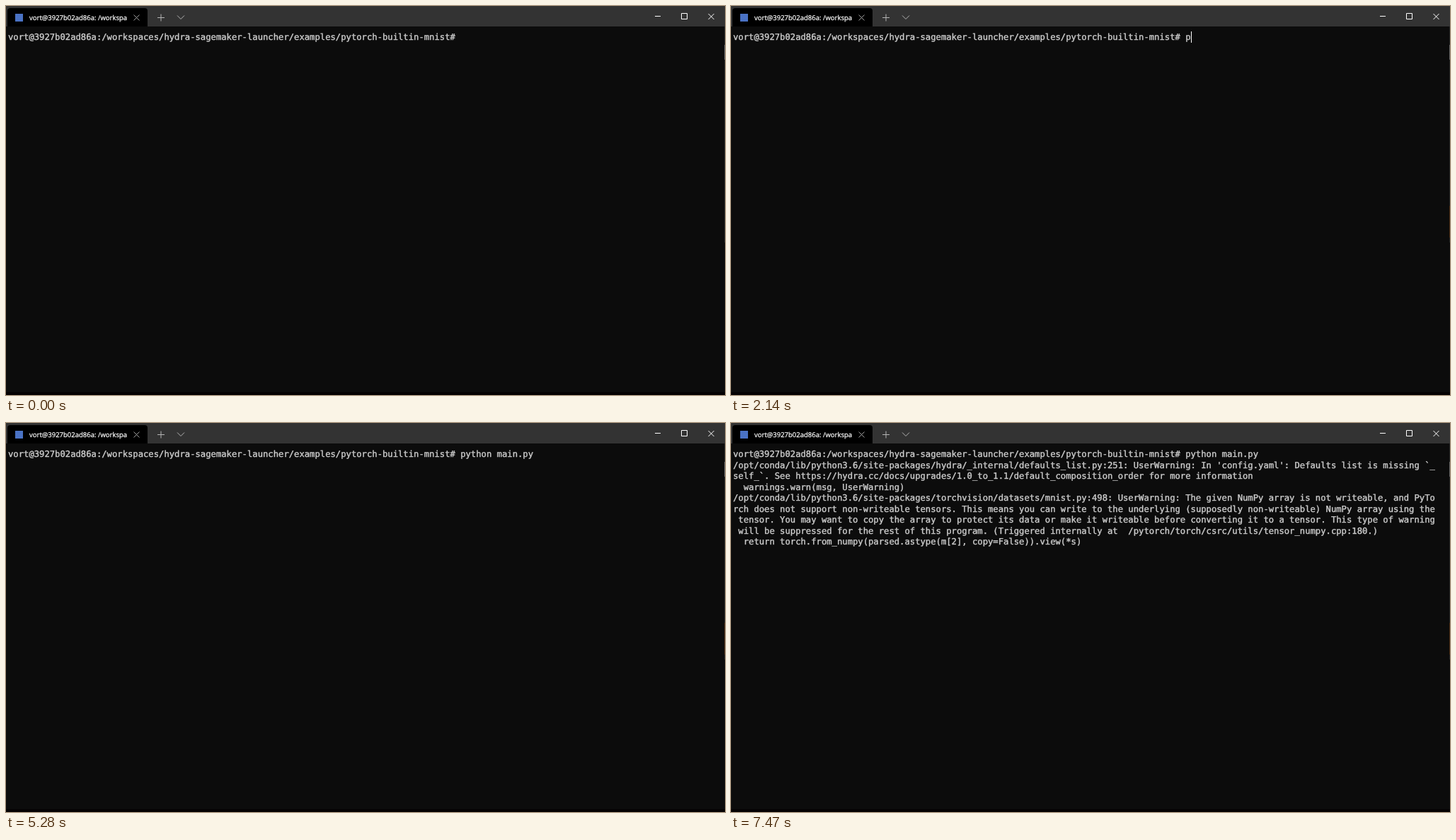
Write an HTML page with a canvas that moves like this. It is 1016 by 551 pixels and loops after 8 s.

```html
<!DOCTYPE html>
<html lang="en">
<head>
<meta charset="utf-8">
<title>Terminal</title>
<style>
html, body { margin: 0; width: 100%; height: 100%; overflow: hidden; background: #0c0c0c; }
canvas { display: block; }
</style>
</head>
<body>
<canvas id="stage" width="1016" height="551"></canvas>
<script>
const ctx = document.getElementById("stage").getContext("2d");
const LOOP = 8000, LEFT = 3, TOP = 36, PITCH = 7.35, LINE = 15.5;
const HOST = "vort@3927b02ad86a:";
const PROMPT = HOST + "/workspaces/hydra-sagemaker-launcher/examples/pytorch-builtin-mnist# ";
const COMMAND = "python main.py";

// [time, number of command characters typed]
const KEYS = [[2140, 1], [2210, 2], [2410, 3], [2510, 4], [2610, 5], [2810, 6], [2940, 7],
  [3140, 8], [3240, 9], [3340, 11], [3600, 12], [4000, 14]];

const OUTPUT = [
  [5350, "/opt/conda/lib/python3.6/site-packages/hydra/_internal/defaults_list.py:251: UserWarning: In 'config.yaml': Defaults list is missing `_"],
  [5350, "self_`. See https://hydra.cc/docs/upgrades/1.0_to_1.1/default_composition_order for more information"],
  [5350, "  warnings.warn(msg, UserWarning)"],
  [5550, "/opt/conda/lib/python3.6/site-packages/torchvision/datasets/mnist.py:498: UserWarning: The given NumPy array is not writeable, and PyTo"],
  [5550, "rch does not support non-writeable tensors. This means you can write to the underlying (supposedly non-writeable) NumPy array using the"],
  [5550, " tensor. You may want to copy the array to protect its data or make it writeable before converting it to a tensor. This type of warning"],
  [5550, " will be suppressed for the rest of this program. (Triggered internally at  /pytorch/torch/csrc/utils/tensor_numpy.cpp:180.)"],
  [5550, "  return torch.from_numpy(parsed.astype(m[2], copy=False)).view(*s)"]
];

// Periods in which the text cursor is lit
const CURSOR_ON = [[1480, 2010], [2140, 5280], [5810, 6340], [6940, 7470]];

function rect(color, x, y, w, h) {
  ctx.fillStyle = color;
  ctx.fillRect(x, y, w, h);
}

function stroke(color, path, width = 1) {
  ctx.strokeStyle = color;
  ctx.lineWidth = width;
  ctx.stroke(new Path2D(path));
}

// A thin outline gives the text its medium weight
function text(str, x, y, font, color, outline) {
  ctx.font = font;
  ctx.fillStyle = ctx.strokeStyle = color;
  ctx.lineWidth = outline;
  ctx.lineJoin = "round";
  ctx.fillText(str, x, y);
  ctx.strokeText(str, x, y);
  ctx.lineJoin = "miter";
}

function drawWindow(t) {
  rect("#0c0c0c", 0, 0, 1016, 551);
  rect("#333333", 0, 0, 1016, 29);
  rect("#050203", 0, 547, 1016, 4);
  rect("#222422", 1015, 29, 1, 306);
  rect("#666666", 1015, 55, 1, 21);
  if (t >= 1610) rect("#4a2c14", 1015, 283, 1, 45);

  ctx.fillStyle = "#000000";
  ctx.beginPath();
  ctx.roundRect(2, 3, 198, 26, [4, 4, 0, 0]);
  ctx.fill();
  rect("#4a72c4", 13, 11, 11, 11);
  text(HOST + " /workspa", 33, 20, "9.5px 'Open Sans', sans-serif", "#ffffff", 0.25);

  stroke("#a0a0a0", "M180.5 12.5l8 8m0-8l-8 8");
  stroke("#b4b4b4", "M214 16.5h10m-5-5v10");
  stroke("#b4b4b4", "M242 13.5l5 5l5-5");
  stroke("#ffffff", "M917 14.5h8M954.5 10.5h8v8h-8z");
  stroke("#ffffff", "M992.5 11l8 8m0-8l-8 8");
}

function drawPointer(t) {
  if (t < 130 || t >= 2140) return;
  const step = Math.min(3, Math.floor((t - 130) / 70)) / 3;
  const rest = (1 - step) ** 2;
  const x = 875 + 62 * rest, y = 295 + 168 * rest;
  const clicking = t >= 1480 && t < 1610;
  if (clicking) {
    ctx.fillStyle = "#858500";
    ctx.beginPath();
    ctx.arc(x, y, 10, 0, Math.PI * 2);
    ctx.fill();
  }
  const arrow = new Path2D();
  arrow.addPath(new Path2D("M0 0V12L2.8 9.5L4.8 14L6.7 13.2L4.8 8.8H8.8Z"), { e: x, f: y });
  ctx.fillStyle = clicking ? "#ffffe6" : "#ffffff";
  ctx.fill(arrow);
  stroke("#111111", arrow, 0.6);
}

function drawTerminal(t) {
  const typed = KEYS.reduce((count, [at, n]) => t >= at ? n : count, 0);
  const lines = [PROMPT + COMMAND.slice(0, typed)];
  if (t >= 4600) lines.push("");
  const shown = OUTPUT.filter(([at]) => t >= at).map(([, line]) => line);
  if (shown.length) lines.splice(1, 1, ...shown, "");

  lines.forEach((line, i) =>
    text(line, LEFT, TOP + 12 + i * LINE, "12.21px 'DejaVu Sans Mono', monospace", "#cccccc", 0.4));

  if (CURSOR_ON.some(([on, off]) => t >= on && t < off)) {
    const row = lines.length - 1;
    const x = Math.round(LEFT + lines[row].length * PITCH + 0.2);
    rect("#ffffff", x, Math.floor(TOP + row * LINE), 1, 16);
  }
}

function frame() {
  const t = performance.now() % LOOP;
  ctx.textRendering = "geometricPrecision";
  drawWindow(t);
  drawTerminal(t);
  drawPointer(t);
  requestAnimationFrame(frame);
}
frame();
</script>
</body>
</html>
```
